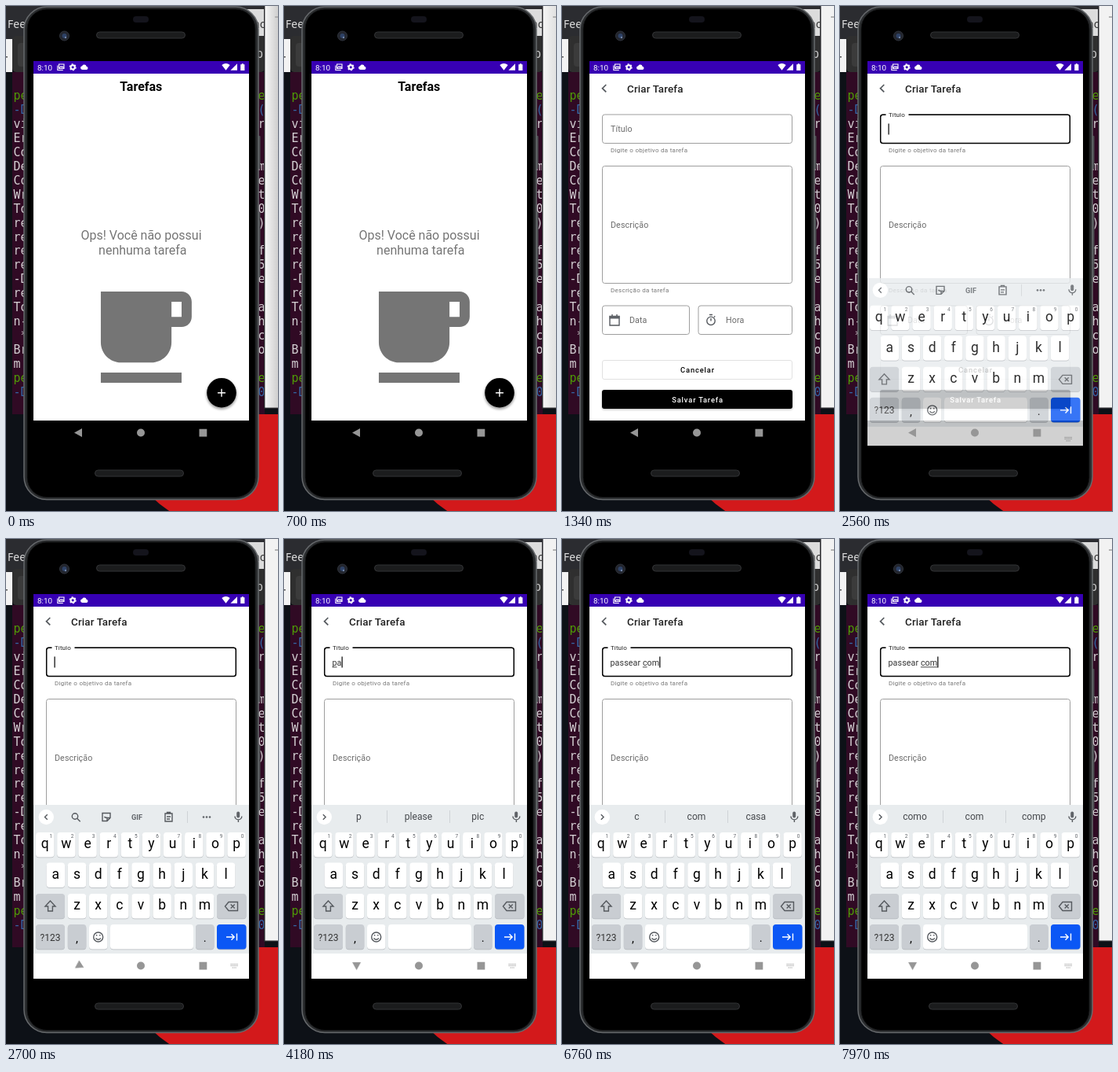
An HTML page for the animation above (8000 ms loop, 347x642 px).

```html
<!DOCTYPE html>
<html lang="pt">
<head>
<meta charset="utf-8">
<title>Tarefas</title>
<style>
  html, body { margin: 0; width: 100%; height: 100%; overflow: hidden; background: #0d1117; }
  svg { display: block; width: 347px; height: 642px; font-family: Roboto, sans-serif; }
  #list, #form { transform-origin: 172.5px 314.5px; }
  #back { transform-origin: 92.6px 542.5px; }
  .mid { text-anchor: middle; }
  .mono { font: 15px "DejaVu Sans Mono", monospace; }
  .line { fill: none; stroke: #55595e; stroke-width: 1.4; }
  .box { fill: none; stroke: #9e9e9e; }
  .input { font-size: 10.7px; letter-spacing: .1px; fill: #6b6b6b; }
  .help { font-size: 8px; letter-spacing: .27px; fill: #777; }
  .button { font-size: 9.4px; font-weight: 500; letter-spacing: .84px; text-anchor: middle; }
  .key { font-size: 17.5px; text-anchor: middle; fill: #000; }
  .digit { font-size: 6.5px; fill: #5f6368; }
  .word { font-size: 12.1px; text-anchor: middle; fill: #46494d; }
</style>
</head>
<body>
<svg id="stage" viewBox="0 0 347 642"></svg>
<script>
const LOOP = 8000;
const $ = id => document.getElementById(id);
const rect = (x, y, w, h, fill, r = 0, more = '') =>
  `<rect x="${x}" y="${y}" width="${w}" height="${h}" rx="${r}" fill="${fill}" ${more}/>`;
const disc = (x, y, r, fill, more = '') => `<circle cx="${x}" cy="${y}" r="${r}" fill="${fill}" ${more}/>`;
const text = (x, y, str, attrs = '') => `<text x="${x}" y="${y}" ${attrs}>${str}</text>`;
const path = (d, attrs = 'class="line"') => `<path d="${d}" ${attrs}/>`;
const group = (id, body, attrs = '') => `<g id="${id}" ${attrs}>${body}</g>`;

function terminal() {
  const left = ['pe', '-D', 'vi', 'Er', 'Co', 'De', 'Co', 'Wr', 'To', 're', 're', 're', 're', '-D', 're', 'To', 'n-', ' *', 'Br', 'm', 'pe', '-D'];
  const right = ['me', '2(', ' r', '', '', ' m', ' e', ' t', '.0', ' )', '', ' f', ' 5', ' e', '', 'ta', ' h', ' c', 'to', '', 'me', '20'];
  const color = i => i % 20 === 0 ? '#4e9a06' : i % 20 === 1 ? '#3465a4' : '#d3cfd2';
  const column = (x, words) => words.map((w, i) => text(x, 119 + i * 17.95, w,
    `class="mono" xml:space="preserve" fill="${color(i)}" font-weight="${i % 20 < 2 ? 700 : 400}"`)).join('');
  return rect(8, 84, 322, 435, '#300a24') + column(9.5, left) + column(312.5, right);
}

function desktop() {
  return rect(0, 0, 347, 642, '#0d1117') +
    rect(0, 0, 330, 42, '#2b2c30') + text(2, 28, 'Fee', 'font-size="14" fill="#dedede" font-family="Noto Sans, sans-serif"') +
    rect(300, 4, 30, 34, '#dcdcdc') + text(315, 28, 'no', 'font-size="14" fill="#333" font-family="Noto Sans, sans-serif"') +
    rect(0, 42, 8, 42, '#f3f3f3') + rect(0, 64, 2, 1.5, '#555') +
    rect(8, 38, 322, 46, '#2f2f2f', 5) + rect(15, 47, 20, 30, '#3b3b3b', 4) + text(319, 66, 'p', 'class="mono" fill="#ccc"') +
    terminal() +
    `<g clip-path="url(#below)">${disc(280, 530, 133, '#d3191b')}</g>` +
    rect(329, 0, 18, 512, '#26262a') + rect(330.5, 0, 17, 510.5, '#f2f2f2') + rect(343, 13.5, 4, 1, '#777') +
    rect(330.5, 0, 17, 510.5, 'url(#shade)', 0, 'id="dim"');
}

function phone() {
  const slot = (x, y) => rect(x, y, 113, 8, '#1b1c1d', 4, 'stroke="#333436"');
  return rect(321, 165, 3.5, 42, '#4b4d50', 1) + rect(321, 262, 3.5, 83, '#4b4d50', 1) +
    rect(23, 1, 299, 626.5, '#2b2d2f', 29, 'stroke="#66696c" stroke-width="1.5"') +
    rect(27, 4, 291, 620.5, '#000', 25, 'stroke="#151617"') +
    slot(115.5, 33) + slot(113.5, 590) +
    rect(162, 13, 20, 8, '#14141c', 4) +
    disc(74.5, 38, 6, '#22252d', 'stroke="#30343c"') + disc(74.5, 38, 3, '#2e4266') + disc(76, 40, 1.2, '#7186a8');
}

const windowBack = rect(35, 70, 275, 489, '#fff') + rect(35, 70, 275, 16, '#3700b3') + rect(35, 527, 275, 32, '#000');

function listScreen() {
  const cup = 'M20 3H4v10c0 2.21 1.79 4 4 4h6c2.21 0 4-1.79 4-4v-3h2c1.11 0 2-.89 2-2V5c0-1.11-.89-2-2-2zm0 5h-2V5h2zM4 19h16v2H4z';
  return windowBack +
    text(172.3, 108.3, 'Tarefas', 'class="mid" font-size="16" font-weight="700"') +
    `<g class="mid" font-size="16" fill="#757575">${text(172.5, 297, 'Ops! Você não possui')}${text(174.3, 315.6, 'nenhuma tarefa')}</g>` +
    path(cup, 'fill="#757575" transform="translate(95.2 343.7) scale(6.44)"') +
    disc(275, 493.5, 19.5, '#000', 'opacity=".35" filter="url(#blur)"') + disc(275, 491.7, 18.8, '#000') +
    path('M270 491.7h10M275 486.7v10', 'stroke="#fff" stroke-width="1.4"');
}

function formScreen() {
  const box = (x, y, w, h) => rect(x, y, w, h, 'none', 3, 'class="box"');
  const label = (x, y, s) => text(x, y, s, 'class="input"');
  const help = (y, s) => text(62, y, s, 'class="help"');
  return windowBack +
    path('M56.3 100l-4.8 4.7 4.8 4.7', 'class="line" style="stroke-width:1.7"') +
    text(83, 109.5, 'Criar Tarefa', 'font-size="13.4" font-weight="500" letter-spacing=".15" fill="#222"') +
    box(51.5, 138, 242, 36.5) +
    group('focus', rect(51.7, 138.2, 241.6, 36.2, 'none', 3, 'stroke="#000" stroke-width="1.5"') + rect(58.5, 136, 29, 4, '#fff')) +
    `<text id="label" class="input">Título</text>` +
    text(61.5, 160.5, '', 'id="typed" class="input" style="fill:#333"') +
    rect(61.5, 162.4, 0, .9, '#333', 0, 'id="under"') + rect(61.5, 149.5, 1.2, 14, '#000', 0, 'id="caret"') +
    help(186.3, 'Digite o objetivo da tarefa') +
    box(51.5, 203.5, 242, 149) + label(62, 281.7, 'Descrição') + help(364, 'Descrição da tarefa') +
    box(51.5, 381, 111, 36.5) + label(86, 403, 'Data') +
    path('M61 394.5h12v11.5h-12zM64 392v2M70 392v2') + rect(60.5, 394, 13, 3.5, '#5f6368') +
    box(174, 381, 119.5, 36.5) + label(209, 403, 'Hora') +
    path('M188 392.5h4M190 397v3.5M194 395.5l1.2-1.2') + disc(190, 400.3, 5.2, 'none', 'class="line"') +
    rect(51.5, 450.5, 242, 24, '#fff', 2.5, 'stroke="#e1e1e1"') + text(173, 466, 'Cancelar', 'class="button"') +
    rect(51, 488.7, 243, 24.3, '#000', 3, 'opacity=".3" filter="url(#blur)"') +
    rect(51, 488, 243, 24, '#000', 3) + text(173, 503.5, 'Salvar Tarefa', 'class="button" fill="#fff"');
}

function keyboard() {
  const key = (x, y, w, fill = '#fff') => rect(x, y + .7, w, 31.5, '#b4b8bd', 4) + rect(x, y, w, 31.5, fill, 4);
  const row = (letters, x, y) => [...letters].map((c, i) =>
    key(x + i * 27.15, y, 23.5) + text(x + 11.75 + i * 27.15, y + 20.2, c, 'class="key"')).join('');
  const digits = [...'1234567890'].map((c, i) => text(55.5 + i * 27.15, 380, c, 'class="digit"')).join('');
  const gray = '#c9cdd2';
  const tools = disc(88, 352.5, 3.7, 'none', 'class="line"') + path('M90.7 355.2l4 4') +
    path('M123 348.5h10v6l-4 4h-6zM133 354.5h-4v4M125.5 353q1.5 2 3.5 1') +
    text(167, 357, 'GIF', 'class="mid" font-size="9.2" font-weight="700" fill="#5f6368"') +
    path('M203 349h9v10h-9zM205.5 349v-1.5h4v1.5M205 353h5M205 356h4') + rect(231, 346, 1, 15, '#cfd3d6') +
    [252, 256, 260].map(x => disc(x, 353.5, 1.3, '#5f6368')).join('');
  const words = [95.5, 171.5, 247.3].map((x, i) => text(x, 357.2, '', `id="word${i}" class="word"`)).join('') +
    rect(131, 345, 1, 16, '#cfd3d6') + rect(211, 345, 1, 16, '#cfd3d6');
  return rect(35, 338, 275, 221, '#e8ecee') +
    disc(51.3, 353.5, 9.7, '#fff') + path('', 'id="chevron" class="line"') +
    group('tools', tools) + group('words', words) +
    rect(294.2, 346.5, 4, 8, '#5f6368', 2) + path('M292 352.5a4.4 4.4 0 0 0 8.8 0M296.4 357v3') +
    row('qwertyuiop', 38, 373) + digits + row('asdfghjkl', 51.6, 411.5) + row('zxcvbnm', 78.8, 451) +
    key(38, 451, 37, gray) + path('M56.5 460l-6.5 7h3.6v6h5.8v-6h3.6z') +
    key(269, 451, 37.5, gray) + path('M284 461.5h11.5v11h-11.5l-4.5-5.5zM286.7 464.5l5 5M291.7 464.5l-5 5') +
    key(38, 490, 37, gray) + text(56.5, 510.5, '?123', 'class="mid" font-size="12" fill="#333"') +
    key(78.8, 490, 23.5, gray) + text(90.5, 513, ',', 'class="mid" font-size="15"') +
    key(106, 490, 23.5) + disc(117.7, 506, 6, 'none', 'class="line"') +
    path('M114.5 507.5q3.2 3.5 6.4 0M115.6 503v1.6M119.8 503v1.6') +
    key(133, 490, 106) + key(242, 490, 23.5, gray) + text(253.7, 512, '.', 'class="mid" font-size="15"') +
    key(269, 490, 37.5, '#0b57f5') + path('M281 506h10M287.5 502.3l3.7 3.7-3.7 3.7M294.5 501.5v9', 'class="line" style="stroke:#fff"') +
    rect(35, 527, 275, 32, '#fff') +
    path('M286.5 540.5h10M286.5 542.5h10M288.5 545h6', 'stroke="#a2a2a2" stroke-dasharray="1.3 .7"');
}

function systemIcons() {
  const cloud = 'M19.35 10.04A7.49 7.49 0 0 0 12 4C9.11 4 6.6 5.64 5.35 8.04A6 6 0 0 0 0 14a6 6 0 0 0 6 6h13a5 5 0 0 0 .35-9.96z';
  return text(40, 81.5, '8:10', 'font-size="9.9" fill="#fff"') +
    path('M67.5 74h6.5v5.5h-6.5zM65.8 75.5v6h7M68 79l2-2.2 1.3 1.2 1-1 1.5 2', 'fill="none" stroke="#fff" stroke-width="1.1"') +
    disc(85.2, 77.8, 2.6, 'none', 'stroke="#fff" stroke-width="2"') +
    disc(85.2, 77.8, 3.9, 'none', 'stroke="#fff" stroke-width="1.3" stroke-dasharray="2.04"') +
    path(cloud, 'fill="#fff" transform="translate(95 73) scale(.4)"') +
    path('M275.3 75q5.2-3.8 10.4 0l-5.2 6.8zM295 73.2v8.6h-8.6zM299.2 74.2h1.6v-1h2v1h1.6v7.8h-5.2z', 'fill="#fff"') +
    `<g fill="#969696">${path('M87 542.5l10-5.6v11.2z', 'id="back"')}<circle cx="172" cy="542.5" r="5"/><path d="M246.5 537.7h9.8v9.8h-9.8z"/></g>`;
}

$('stage').innerHTML = `<defs>
  <clipPath id="screen"><path d="M35 70h275v489H35z"/></clipPath>
  <clipPath id="below"><path d="M0 519h347v123H0z"/></clipPath>
  <filter id="blur"><feGaussianBlur stdDeviation="1.8"/></filter>
  <linearGradient id="shade"><stop stop-color="#fff" stop-opacity=".5"/><stop offset="1" stop-color="#999" stop-opacity=".4"/></linearGradient>
  </defs>` + desktop() + phone() +
  `<g clip-path="url(#screen)">${group('list', listScreen())}${group('form', formScreen())}${group('keys', keyboard())}${systemIcons()}</g>`;

// Stepped states: time, typed text, underline start, underline end, suggestions
const steps = [
  [0, '', 0, 0, ''],
  [3930, 'p', 0, 0, ''],
  [4140, 'p', 0, 1, 'p please pic'],
  [4180, 'pa', 0, 1, 'p please pic'],
  [4340, 'pa', 0, 2, 'pa para pai'],
  [4520, 'pas', 0, 2, 'pa para pai'],
  [4720, 'pas', 0, 3, 'pas past passing'],
  [4760, 'pass', 0, 3, 'pas past passing'],
  [4950, 'pass', 0, 4, 'pass past passing'],
  [5170, 'passe', 0, 4, 'pass past passing'],
  [5410, 'passe', 0, 5, 'passe passed passes'],
  [5470, 'passea', 0, 5, 'passe passed passes'],
  [5690, 'passea', 0, 6, 'passea passear passes'],
  [5770, 'passear', 0, 6, 'passea passear passes'],
  [5950, 'passear', 0, 7, 'passea passear passes'],
  [5990, 'passear', 0, 7, 'passear passe passes'],
  [6030, 'passear ', 0, 7, 'passear passe passes'],
  [6220, 'passear ', 0, 0, 'e com no'],
  [6410, 'passear c', 8, 8, 'e com no'],
  [6540, 'passear c', 8, 9, 'c com casa'],
  [6580, 'passear co', 8, 9, 'c com casa'],
  [6760, 'passear com', 8, 9, 'c com casa'],
  [7010, 'passear com', 8, 11, 'com como comer'],
  [7260, 'passear como', 8, 11, 'com como comer'],
  [7470, 'passear como', 8, 12, 'como com comp'],
  [7970, 'passear com', 8, 11, 'como com comp']
];

const start = document.timeline.currentTime ?? performance.now();

// Each row: time, properties, optional easing towards the next row
function animate(id, rows) {
  const all = [[0, rows[0][1]], ...rows, [LOOP, rows[rows.length - 1][1]]];
  const frames = all.map(([ms, props, easing = 'linear']) => ({ offset: ms / LOOP, easing, ...props }));
  $(id).animate(frames, { duration: LOOP, iterations: Infinity }).startTime = start;
}

const OPEN = 1021, RISE = OPEN + 50, OPENED = OPEN + 300;
const fastOut = 'cubic-bezier(.3,0,.8,.15)', slowIn = 'cubic-bezier(.05,.7,.1,1)';
const standard = 'cubic-bezier(.4,0,.2,1)';
const zoom = (from, to) => [[OPEN, from, fastOut], [RISE, from + (to - from) * .4, slowIn], [OPENED, to]]
  .map(([ms, s, easing]) => [ms, { transform: `scale(${s})` }, easing]);
const fade = (from, to, a = 0, b = 1) => [[from, { opacity: a }], [to, { opacity: b }]];

animate('dim', fade(500, 880, 1, 0));
animate('list', zoom(1, 1.05));
animate('form', zoom(.85, 1));
animate('form', fade(1055, 1100));
animate('focus', fade(2259, 2260));
animate('label', [
  [2250, { transform: 'translate(62px,160.3px) scale(1)', fill: '#6b6b6b' }, standard],
  [2417, { transform: 'translate(62px,141px) scale(.75)', fill: '#222' }]
]);
animate('keys', [
  [2420, { transform: 'translateY(44px)', opacity: 0 }, 'ease-out'],
  [2640, { transform: 'translateY(0)', opacity: 1 }]
]);
animate('back', [
  [2600, { transform: 'rotate(0deg)' }, 'ease-in-out'],
  [2840, { transform: 'rotate(-90deg)' }]
]);

let shown = -1;
function showStep(index) {
  if (index === shown) return;
  shown = index;
  const [, str, from, to, suggestions] = steps[index];
  const typed = $('typed');
  const widthOf = s => {
    typed.textContent = s.replace(/ /g, '\u00a0');
    return s ? typed.getComputedTextLength() : 0;
  };
  const left = widthOf(str.slice(0, from)), right = widthOf(str.slice(0, to));
  $('caret').setAttribute('x', 61.5 + widthOf(str));
  $('under').setAttribute('x', 61.5 + left);
  $('under').setAttribute('width', right - left);
  $('tools').style.display = suggestions ? 'none' : '';
  $('words').style.display = suggestions ? '' : 'none';
  suggestions.split(' ').forEach((w, i) => $('word' + i).textContent = w);
  $('chevron').setAttribute('d', suggestions ? 'M49.8 350.2l3.3 3.3-3.3 3.3' : 'M52.8 350.2l-3.3 3.3 3.3 3.3');
}

function render(now) {
  const t = Math.max(0, now - start) % LOOP;
  showStep(steps.findLastIndex(s => s[0] <= t));
  $('caret').style.opacity = t >= 2260 && !(t >= 3280 && t < 3770) ? 1 : 0;
  requestAnimationFrame(render);
}
render(start);
</script>
</body>
</html>
```
